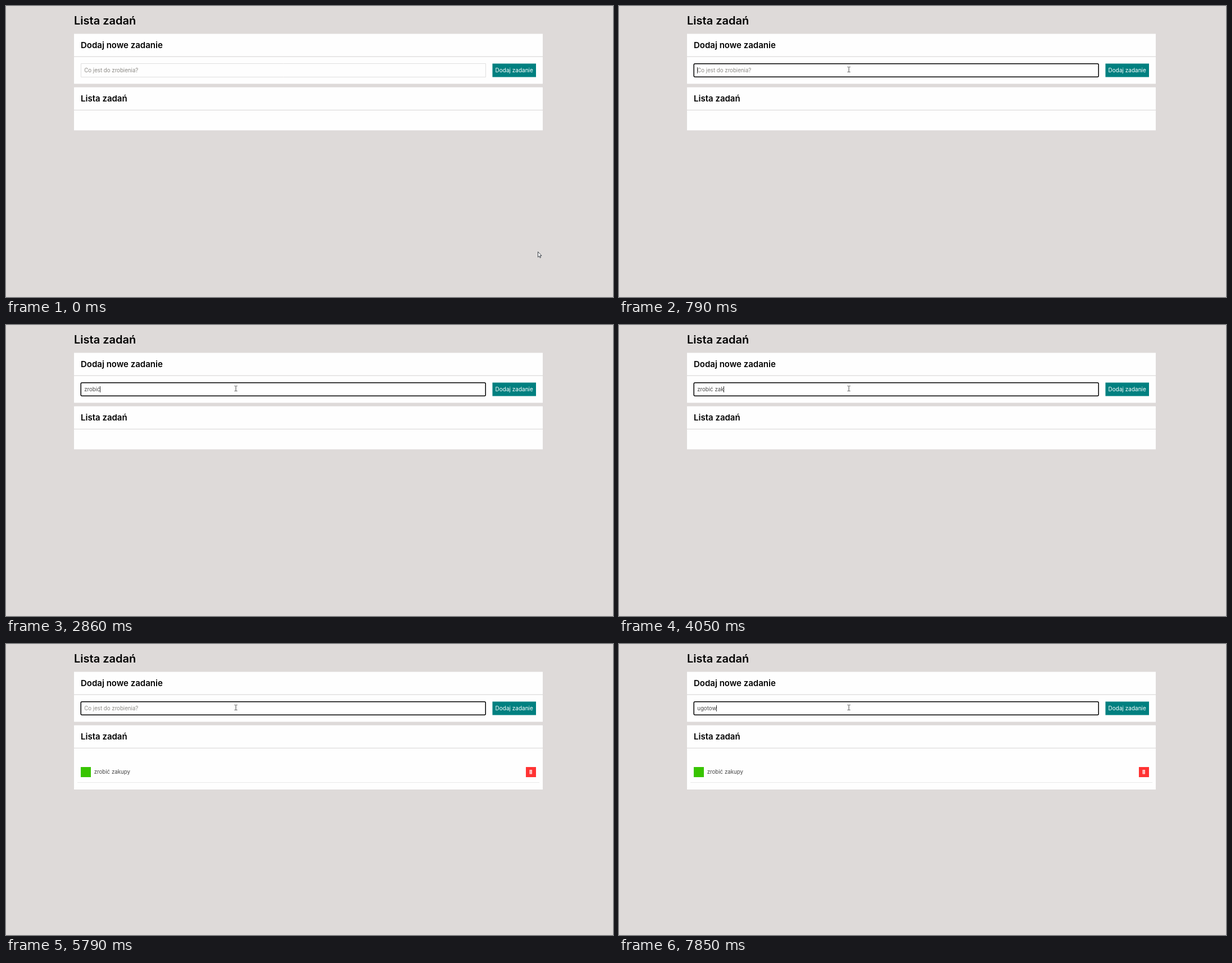
Write an HTML page with a canvas that moves like this. It is 1080x518 px and loops after 8 s.

```html
<!DOCTYPE html>
<html lang="pl">
<head>
<meta charset="utf-8">
<title>Lista zadań</title>
<style>
html, body { margin: 0; width: 100%; height: 100%; overflow: hidden; background: #dedad9; }
canvas { display: block; width: 1080px; height: 518px; }
</style>
</head>
<body>
<canvas id="stage"></canvas>
<script>
const LOOP = 8000;
const FOCUS = 790, SUBMIT = 5790;
const TASK = 'zrobić zakupy';
const TASK_KEYS = [1450, 1870, 2070, 2330, 2460, 2860, 3060, 3190, 3860, 4050, 4320, 4580, 4930];
const NEXT = 'ugotow';
const NEXT_KEYS = [6800, 7130, 7390, 7520, 7650, 7850];
const CARET_OFF = [[1320, 1450], [3720, 3860], [5460, 5990], [6450, 6800]];

const canvas = document.getElementById('stage');
const ctx = canvas.getContext('2d');
const ratio = window.devicePixelRatio || 1;
canvas.width = 1080 * ratio;
canvas.height = 518 * ratio;

function rect(x, y, w, h, color) {
  ctx.fillStyle = color;
  ctx.fillRect(x, y, w, h);
}

function text(str, x, y, size, weight, color, align = 'left') {
  ctx.font = `${weight} ${size}px Inter, sans-serif`;
  ctx.textAlign = align;
  ctx.fillStyle = color;
  ctx.fillText(str, x, y);
  return ctx.measureText(str).width;
}

function panel(y, h, title) {
  rect(121, y, 834, h, '#fefefe');
  text(title, 133, y + 25.3, 15, 600, '#000');
  rect(121, y + 40, 834, 1.2, '#dcdada');
}

const typed = (str, keys, t) => str.slice(0, keys.filter(k => t >= k).length);

function drawInput(t) {
  const focused = t >= FOCUS;
  ctx.beginPath();
  if (focused) {
    ctx.roundRect(133.25, 102.75, 720, 23.5, 2);
    ctx.strokeStyle = '#000';
    ctx.lineWidth = 1.5;
  } else {
    ctx.rect(133.5, 102.5, 720, 24);
    ctx.strokeStyle = '#e0dfdf';
    ctx.lineWidth = 1;
  }
  ctx.stroke();

  const value = t < SUBMIT ? typed(TASK, TASK_KEYS, t) : typed(NEXT, NEXT_KEYS, t);
  let width = text(value, 139.2, 117.5, 9.7, 400, '#4a4a4a');
  if (!value) text('Co jest do zrobienia?', 139.2, 117.5, 9.7, 400, '#8a8883');
  const hidden = CARET_OFF.some(([from, to]) => t >= from && t < to);
  if (focused && !hidden) rect(Math.round(139 + width), 109, 1, 11, '#333');
}

function drawTask() {
  rect(133, 219, 18, 18, '#38c400');
  text(TASK, 156.7, 231.3, 9.7, 400, '#444');
  rect(925, 219, 18, 18, '#ff3333');
  rect(931.5, 224, 4.5, 7.5, '#ffd5d5');
  rect(933, 225, 1.5, 5.5, '#ff9c9c');
  rect(127, 246, 822, 1, '#e9e9e9');
}

function drawArrow(x, y) {
  ctx.beginPath();
  [[0, 0], [0, 9.6], [2.2, 7.6], [3.6, 10.8], [5, 10.2], [3.6, 7.1], [6.5, 7]]
    .forEach(([dx, dy]) => ctx.lineTo(x + dx, y + dy));
  ctx.closePath();
  ctx.fillStyle = '#fff';
  ctx.fill();
  ctx.strokeStyle = '#2a3038';
  ctx.lineWidth = 0.9;
  ctx.stroke();
}

function drawBeam(x, y) {
  rect(x - 0.5, y - 4, 1, 9, '#444');
  for (const dy of [-5, 4]) {
    rect(x - 2.5, y + dy, 2, 1, '#555');
    rect(x + 0.5, y + dy, 2, 1, '#555');
  }
}

function drawPointer(t) {
  // The pointer is sampled in seven steps on its way to the field.
  const step = Math.max(0, Math.min(7, Math.floor((t - 70) / 63.3) + 1));
  const p = (1 - Math.cos(Math.PI * step / 7)) / 2;
  const x = 946.5 + (409.5 - 946.5) * p;
  const y = 437.5 + (114 - 437.5) * p;
  const overField = x > 133 && x < 853 && y > 102 && y < 127;
  if (t >= FOCUS) drawBeam(409, 113);
  else if (overField) drawBeam(x, y);
  else drawArrow(x, y);
}

function draw(t) {
  ctx.setTransform(ratio, 0, 0, ratio, 0, 0);
  rect(0, 0, 1080, 518, '#dedad9');
  text('Lista zadań', 121, 33, 20, 600, '#000');
  panel(49.5, 89, 'Dodaj nowe zadanie');
  drawInput(t);
  rect(865.5, 102.5, 77.5, 24, '#008080');
  text('Dodaj zadanie', 904.2, 117.5, 10, 400, '#fff', 'center');
  panel(144.7, t < SUBMIT ? 76.6 : 114.3, 'Lista zadań');
  if (t >= SUBMIT) drawTask();
  drawPointer(t);
}

const start = performance.now();
function tick() {
  draw((performance.now() - start) % LOOP);
  requestAnimationFrame(tick);
}
tick();
</script>
</body>
</html>
```
